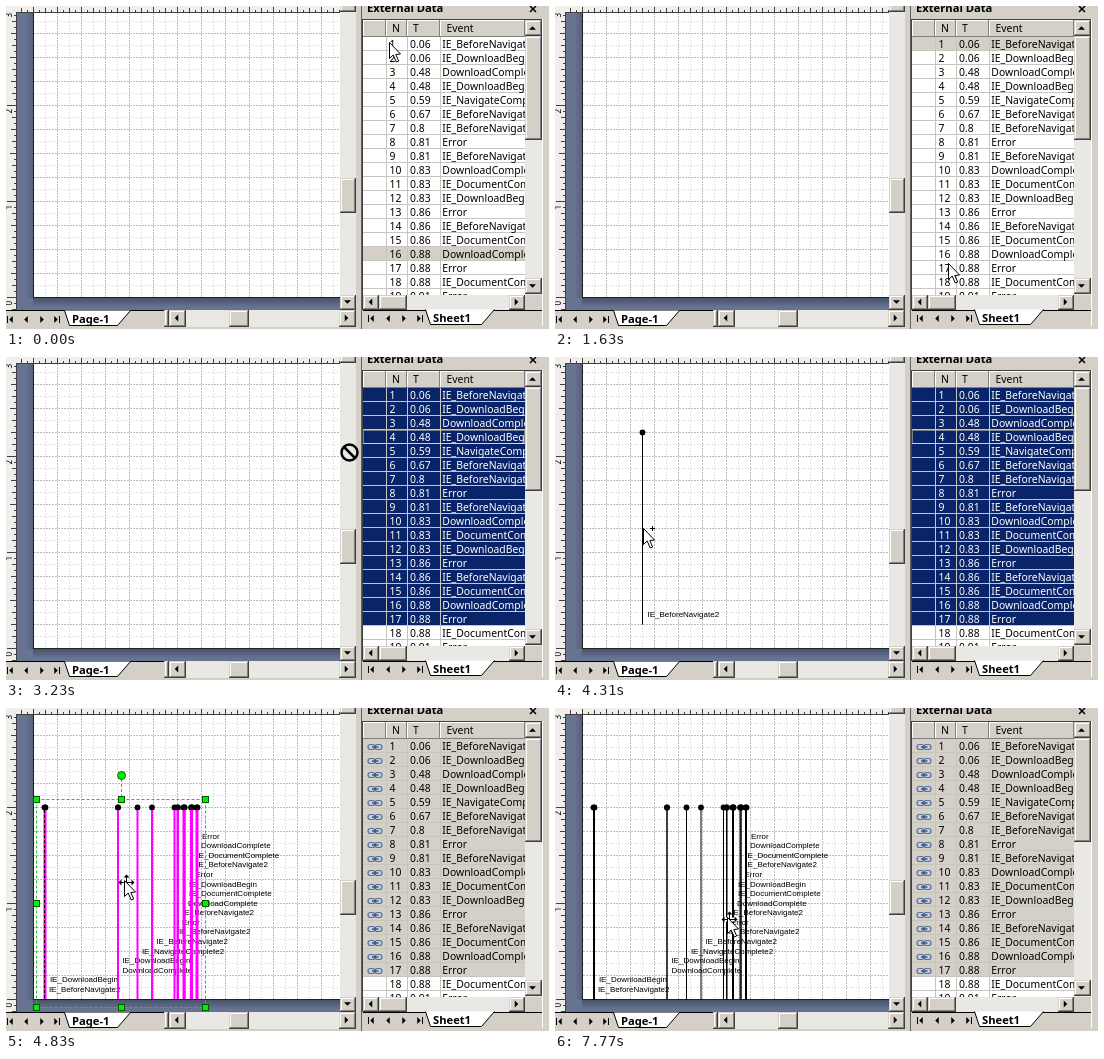
Animation, 543 px wide and 323 px high, one loop 8 s. Source, as an HTML page with a canvas:

```html
<!DOCTYPE html>
<html lang="en">
<head>
<meta charset="utf-8">
<title>Linking table rows to a timeline drawing</title>
<style>
html, body { margin: 0; width: 100%; height: 100%; overflow: hidden; background: #d4d0c8; }
canvas { display: block; }
</style>
</head>
<body>
<canvas id="stage" width="543" height="323"></canvas>
<script>
const ctx = document.getElementById('stage').getContext('2d');
const LOOP = 8000;
const FACE = '#d4d0c8', NAVY = '#0a246a', TRACK = '#eae8e4', GREEN = '#00f000', PINK = '#ff00ff';
const UI = '"Noto Sans", sans-serif';
const ROW_TOP = 31, ROW_H = 14, LINKED = 17;

const BN = 'IE_BeforeNavigate2', DB = 'IE_DownloadBegin', DC = 'DownloadComplete',
  NC = 'IE_NavigateComplete2', OC = 'IE_DocumentComplete', ER = 'Error';
const events = [BN, DB, DC, DB, NC, BN, BN, ER, BN, DC, OC, DB, ER, BN, OC, DC, ER, OC, ER];
const times = [.06, .06, .48, .48, .59, .67, .8, .81, .81, .83, .83, .83, .86, .86, .86, .88, .88, .88, .91];
const lineX = [38.5, 39.5, 112, 112, 131.5, 146, 168.5, 171.5, 172, 177.5, 178.5, 178.5, 185, 186, 186, 190.5, 191.5];

// start time, cursor kind, x, y
const cursorSteps = [
  [0, 'arrow', 383, 36], [560, 'arrow', 383, 34], [810, 'arrow', 424, 114],
  [1090, 'arrow', 413, 260], [1380, 'arrow', 398, 260], [1630, 'arrow', 393, 257],
  [2130, 'arrow', 391, 252], [2400, 'arrow', 421, 96], [2670, 'arrow', 407, 86],
  [2950, 'arrow', 407, 94], [3230, 'noDrop', 334, 86], [3510, 'copy', 172, 123],
  [3790, 'copy', 112, 147], [4040, 'copy', 89, 171], [4310, 'copy', 88, 171],
  [4560, 'wait', 82, 160], [4830, 'move', 111, 166], [5110, 'move', 218, 173],
  [5360, 'arrow', 278, 215], [5610, 'arrow', 285, 238], [7500, 'arrow', 257, 240],
  [7770, 'move', 165, 203]
];
// start time, x, top of the dragged shape
const dragSteps = [[3510, 171.5, 27.5], [3790, 111.5, 51.5], [4040, 87.5, 75.5]];

function rect(x, y, w, h, color) {
  ctx.fillStyle = color;
  ctx.fillRect(x, y, w, h);
}

function path(points, close) {
  ctx.beginPath();
  points.forEach(([x, y]) => ctx.lineTo(x, y));
  if (close) ctx.closePath();
}

function line(x1, y1, x2, y2, color, width = 1, dash = []) {
  ctx.strokeStyle = color;
  ctx.lineWidth = width;
  ctx.setLineDash(dash);
  path([[x1, y1], [x2, y2]]);
  ctx.stroke();
  ctx.setLineDash([]);
}

function box(x, y, w, h, color, dash = []) {
  ctx.strokeStyle = color;
  ctx.lineWidth = 1;
  ctx.setLineDash(dash);
  ctx.strokeRect(x + .5, y + .5, w - 1, h - 1);
  ctx.setLineDash([]);
}

function disc(x, y, r, fill, stroke) {
  ctx.beginPath();
  ctx.arc(x, y, r, 0, Math.PI * 2);
  ctx.fillStyle = fill;
  ctx.fill();
  if (stroke) {
    ctx.strokeStyle = stroke;
    ctx.lineWidth = 1;
    ctx.stroke();
  }
}

function gradient(x1, y1, x2, y2, from, to) {
  const g = ctx.createLinearGradient(x1, y1, x2, y2);
  g.addColorStop(0, from);
  g.addColorStop(1, to);
  return g;
}

function text(s, x, y, font, color = '#000') {
  ctx.font = font;
  ctx.fillStyle = color;
  ctx.fillText(s, x, y);
}

function clipped(x, y, w, h, draw) {
  ctx.save();
  ctx.beginPath();
  ctx.rect(x, y, w, h);
  ctx.clip();
  draw();
  ctx.restore();
}

function button(x, y, w, h) {
  rect(x, y, w, h, '#404040');
  rect(x, y, w - 1, h - 1, FACE);
  rect(x + 1, y + 1, w - 2, h - 2, '#808080');
  rect(x + 1, y + 1, w - 3, h - 3, '#fff');
  rect(x + 2, y + 2, w - 4, h - 4, FACE);
}

// turn: quarter turns clockwise from pointing right
function triangle(x, y, turn, size = 3.5) {
  ctx.save();
  ctx.translate(x, y);
  ctx.rotate(turn * Math.PI / 2);
  ctx.fillStyle = '#000';
  path([[-size / 2, -size], [size / 2, 0], [-size / 2, size]], true);
  ctx.fill();
  ctx.restore();
}

function arrowButton(x, y, w, h, turn) {
  button(x, y, w, h);
  triangle(x + Math.floor(w / 2) - .5, y + Math.floor(h / 2), turn);
}

function pageNav(xs, y) {
  const [first, prev, next, last] = xs;
  rect(first - 4, y - 3, 1, 7, '#000');
  triangle(first, y + .5, 2);
  triangle(prev, y + .5, 2);
  triangle(next, y + .5, 0);
  triangle(last, y + .5, 0);
  rect(last + 3, y - 3, 1, 7, '#000');
}

function tab(left, right, top, label, labelX) {
  ctx.fillStyle = '#fff';
  path([[left, top], [left + 5, top + 15], [right - 13, top + 15], [right, top]]);
  ctx.fill();
  ctx.strokeStyle = '#000';
  ctx.lineWidth = 1;
  ctx.stroke();
  text(label, labelX, top + 12.5, 'bold 11.2px ' + UI);
}

function tickSize(n) {
  return n % 16 === 0 ? 9 : n % 8 === 0 ? 6 : n % 4 === 0 ? 5 : n % 2 === 0 ? 4 : 2;
}

function rulers() {
  rect(0, 0, 334, 7, '#efeeeb');
  rect(0, 0, 10, 304, '#efeeeb');
  for (let n = -2; n < 52; n++) {
    const s = Math.min(5, tickSize(n + 16));
    const x = 27 + n * 6;
    if (x < 334) rect(x, 6 - s, 1, s, '#404040');
  }
  for (let n = -2; n < 48; n++) {
    const s = tickSize(n + 16);
    rect(10 - s, 291 - n * 6, s, 1, '#404040');
  }
  for (let n = 0; n < 4; n++) {
    ctx.save();
    ctx.translate(5.5, 299.5 - n * 96);
    ctx.rotate(-Math.PI / 2);
    text(String(n), 0, 0, '8px ' + UI);
    ctx.restore();
  }
  rect(10, 6, 324, 1, '#404040');
  rect(10, 6, 1, 298, '#404040');
}

function page() {
  rect(11, 7, 323, 297, '#667391');
  rect(20, 7, 7, 285, gradient(20, 0, 27, 0, '#667391', '#56617c'));
  rect(27, 292, 307, 9, gradient(0, 292, 0, 301, '#48526a', '#667391'));
  rect(27, 7, 307, 285, '#202020');
  rect(28, 7, 306, 284, '#fff');
  const grid = (k, ...ends) => line(...ends, k % 2 ? '#cccccc' : '#bcbcbc', 1, k % 2 ? [1, 2] : [2, 1]);
  for (let k = 1; 27.5 + k * 12 < 334; k++) grid(k, 27.5 + k * 12, 7, 27.5 + k * 12, 291);
  for (let k = 1; 291.5 - k * 12 > 7; k++) grid(k, 28, 291.5 - k * 12, 334, 291.5 - k * 12);
}

function drawingBars() {
  rect(334, 0, 16, 304, TRACK);
  button(334, -10, 16, 16);
  button(334, 172, 16, 35);
  arrowButton(334, 289, 16, 15, 1);
  rect(0, 304, 350, 19, FACE);
  rect(0, 304, 160, 1, '#000');
  pageNav([5, 20, 36, 50], 313);
  tab(58.5, 124.5, 304.5, 'Page-1', 66);
  button(158, 304, 5, 17);
  rect(163, 304, 187, 17, TRACK);
  arrowButton(163, 304, 17, 17, 2);
  button(223, 304, 20, 17);
  arrowButton(333, 304, 17, 17, 0);
}

function panel() {
  rect(350, 0, 193, 323, FACE);
  rect(355, 0, 1, 323, '#606060');
  text('External Data', 361, 6, 'bold 11.2px ' + UI);
  line(524, 0, 530, 6, '#000', 1.5);
  line(530, 0, 524, 6, '#000', 1.5);
  rect(356, 13, 180, 1, '#404040');
  rect(356, 13, 1, 291, '#404040');
  rect(536, 13, 1, 307, '#fff');
  [357, 380, 401, 434].forEach((x, i, all) => {
    const w = (all[i + 1] || 519) - x;
    rect(x, 14, w, 17, '#808080');
    rect(x, 14, w - 1, 16, '#fff');
    rect(x + 1, 15, w - 2, 15, FACE);
  });
  const font = '10.4px ' + UI;
  text('N', 386, 26, font);
  text('T', 407, 26, font);
  text('Event', 440.5, 26, font);

  rect(519, 14, 17, 275, TRACK);
  arrowButton(519, 14, 17, 16, 3);
  button(519, 30, 17, 104);
  arrowButton(519, 272, 17, 16, 1);
  rect(357, 289, 162, 15, TRACK);
  arrowButton(357, 289, 16, 15, 2);
  button(373, 289, 28, 15);
  arrowButton(503, 289, 16, 15, 0);
  rect(519, 289, 17, 15, FACE);
  rect(357, 304, 179, 1, '#000');
  pageNav([366, 382, 398, 413], 312);
  tab(419.5, 488.5, 303.5, 'Sheet1', 427);
}

function linkIcon(y) {
  ctx.strokeStyle = '#5a7096';
  ctx.lineWidth = 1.2;
  for (const x of [362, 369]) {
    ctx.beginPath();
    ctx.roundRect(x, y - 2.5, 7, 5, 2.5);
    ctx.fillStyle = '#c4d0e4';
    ctx.fill();
    ctx.stroke();
  }
  line(366, y, 372.5, y, '#2c4470', 1.3);
}

function rowColor(i, t) {
  if (t < 560) return i === 15 ? FACE : '#fff';
  if (t < 2130) return i ? '#fff' : t < 810 ? NAVY : FACE;
  if (i >= LINKED) return '#fff';
  return t < 4830 ? NAVY : FACE;
}

function table(t) {
  rect(357, ROW_TOP, 162, 258, '#fff');
  clipped(357, ROW_TOP, 162, 258, () => {
    const font = '10.4px ' + UI;
    events.forEach((name, i) => {
      const y = ROW_TOP + i * ROW_H, fill = rowColor(i, t);
      const ink = fill === NAVY ? '#fff' : '#000';
      rect(357, y, 162, ROW_H, fill);
      rect(357, y + ROW_H - 1, 162, 1, '#c8c5be');
      for (const x of [380, 401, 434]) rect(x, y, 1, ROW_H, '#c8c5be');
      text(String(i + 1), 383.5, y + 11, font, ink);
      text(String(times[i]), 404, y + 11, font, ink);
      text(name, 436.3, y + 11, font, ink);
      if (t >= 4560 && i < LINKED) linkIcon(y + 8);
    });
    const focus = t >= 2130 && t < 2950 ? 16 : t >= 2950 && t < 4560 ? 3 : -1;
    if (focus >= 0) box(357, ROW_TOP + focus * ROW_H, 162, ROW_H, '#f5db95', [1, 1]);
  });
}

function label(name, x, middle) {
  text(name, x, middle + 3, '8px "Liberation Sans", Arial, sans-serif');
}

function marker(x, top) {
  line(x, top, x, top + 192, '#000');
  disc(x, top, 2.9, '#000');
}

function handles() {
  box(30, 91, 170, 209, '#30c030', [3, 2]);
  line(115.5, 71, 115.5, 88, '#30c030', 1, [3, 2]);
  for (const x of [30, 115, 199]) {
    for (const y of [91, 195, 299]) {
      if (x === 115 && y === 195) continue;
      rect(x - 3, y - 3, 7, 7, '#005800');
      rect(x - 2, y - 2, 5, 5, GREEN);
    }
  }
  disc(115.5, 67.5, 4, GREEN, '#006800');
}

function timeline() {
  events.slice(0, LINKED).forEach((name, i) => label(name, lineX[i] + 4.4, 281 - i * 9.59));
  lineX.forEach(x => marker(x, 99.5));
}

function selection() {
  for (const x of lineX) line(x, 102, x, 291, PINK, 2);
  line(lineX[0], 102, lineX[0], 291, '#000', 1, [3, 2]);
  handles();
}

function arrow(x, y) {
  ctx.save();
  ctx.translate(x, y);
  path([[.5, .5], [.5, 16.5], [4.2, 13], [7.3, 20], [9.7, 19], [6.8, 12.5], [11.5, 12]], true);
  ctx.fillStyle = '#fff';
  ctx.fill();
  ctx.strokeStyle = '#000';
  ctx.lineWidth = 1;
  ctx.stroke();
  ctx.restore();
}

const cursors = {
  arrow,
  copy(x, y) {
    arrow(x, y);
    rect(x + 7, y, 5, 1, '#000');
    rect(x + 9, y - 2, 1, 5, '#000');
  },
  move(x, y) {
    const cx = x + 9.5, cy = y + 8.5;
    line(cx - 6, cy, cx + 6, cy, '#fff', 4);
    line(cx, cy - 6, cx, cy + 6, '#fff', 4);
    line(cx - 6, cy, cx + 6, cy, '#000', 1);
    line(cx, cy - 6, cx, cy + 6, '#000', 1);
    for (let q = 0; q < 4; q++) {
      const a = q * Math.PI / 2;
      triangle(cx + Math.cos(a) * 6.5, cy + Math.sin(a) * 6.5, q, 3);
    }
    arrow(x + 7, y + 6);
  },
  noDrop(x, y) {
    const cx = x + 9.5, cy = y + 9.5;
    ctx.beginPath();
    ctx.arc(cx, cy, 8, 0, Math.PI * 2);
    ctx.strokeStyle = '#000';
    ctx.lineWidth = 2.5;
    ctx.stroke();
    line(cx - 5.5, cy - 5.5, cx + 5.5, cy + 5.5, '#000', 2.5);
  },
  wait(x, y) {
    ctx.fillStyle = '#fff';
    path([[x + 1.5, y + 2], [x + 10.5, y + 2], [x + 10.5, y + 6], [x + 7, y + 11], [x + 10.5, y + 16],
      [x + 10.5, y + 20], [x + 1.5, y + 20], [x + 1.5, y + 16], [x + 5, y + 11], [x + 1.5, y + 6]], true);
    ctx.fill();
    ctx.strokeStyle = '#000';
    ctx.lineWidth = 1;
    ctx.stroke();
    rect(x, y, 12, 2, '#000');
    rect(x, y + 20, 12, 2, '#000');
    rect(x + 4, y + 17, 4, 2, '#000');
  }
};

function current(steps, t) {
  return steps.findLast(step => step[0] <= t);
}

function draw(t) {
  page();
  rulers();
  clipped(11, 7, 323, 297, () => {
    if (t >= 3510 && t < 4560) {
      const [, x, top] = current(dragSteps, t);
      marker(x, top);
      label(BN, x + 5, top + 181.5);
    } else if (t >= 4830) {
      timeline();
      if (t < 5880) selection();
    }
  });
  drawingBars();
  panel();
  table(t);
  const [, kind, x, y] = current(cursorSteps, t);
  cursors[kind](x, y);
}

const start = performance.now();
function frame() {
  draw((performance.now() - start) % LOOP);
  requestAnimationFrame(frame);
}
frame();
</script>
</body>
</html>
```
